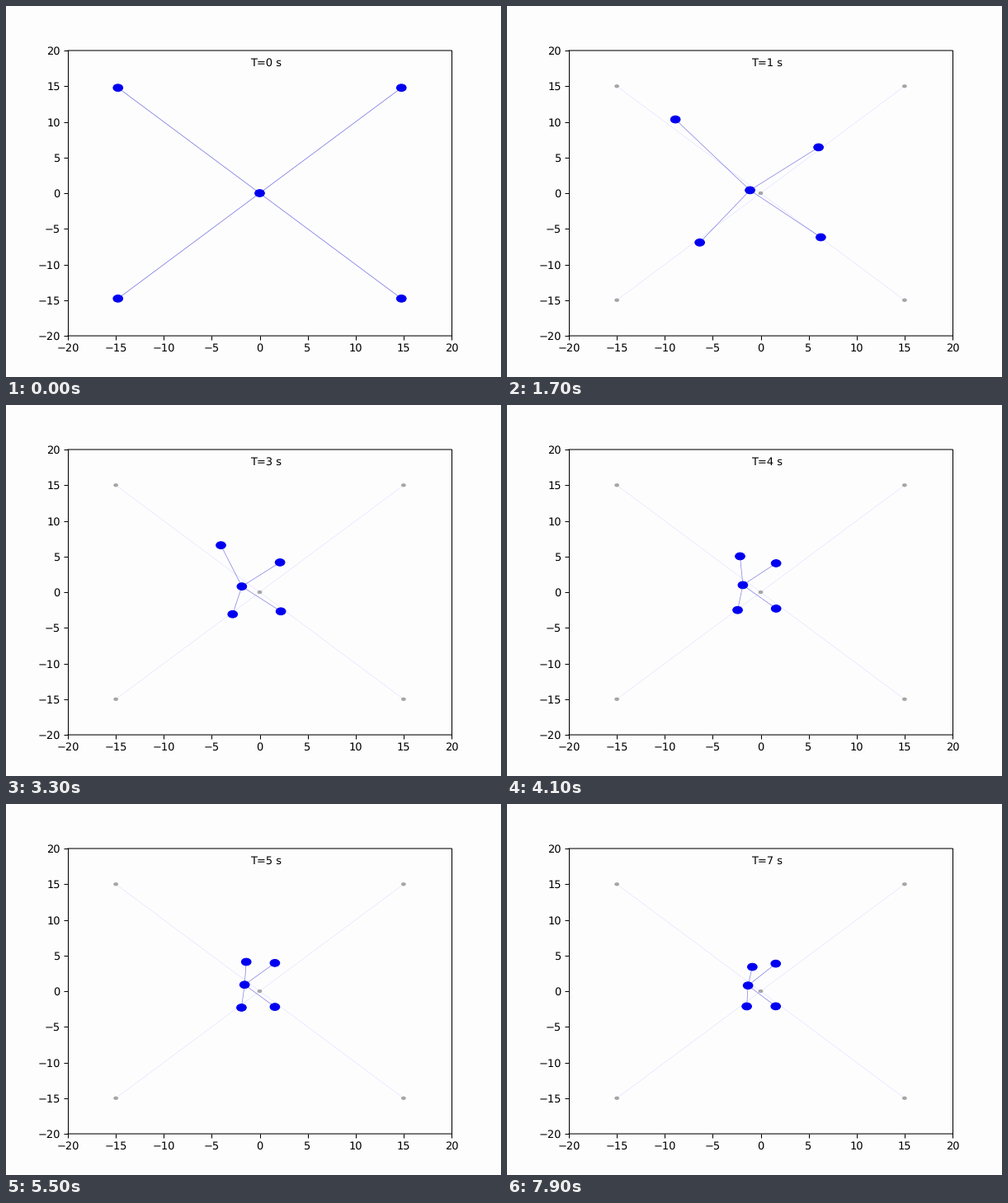
Write a matplotlib script that moves like this. It is 600 px wide and 450 px high and loops after 8000 ms.

```python
import matplotlib.pyplot as plt
import numpy as np
from matplotlib.animation import FuncAnimation
from matplotlib.patches import Circle

FPS = 10
FRAMES = 80
GATHER, END = 4.2, 8.0  # seconds at which the two phases finish
BACK = "#fefdfe"
BLUE = "#0000f0"
CORNERS = 15 * np.array([(-1, 1), (1, 1), (-1, -1), (1, -1)])

# Per agent: gathering point, final point, easing power along x and y
AGENTS = np.array([
    [(-2.0, 4.9), (-0.87, 3.40), (1.19, 1.15)],
    [(1.6, 4.05), (1.57, 3.86), (2.1, 2.9)],
    [(-2.4, -2.5), (-1.45, -2.13), (2.2, 1.97)],
    [(1.6, -2.3), (1.57, -2.12), (2.0, 2.25)],
])
HUB_GATHER = np.array([-1.86, 1.02])
HUB_FINAL = np.array([-1.32, 0.79])


def ease_out(t, start, stop, power):
    u = np.clip((t - start) / (stop - start), 0, 1)
    return 1 - (1 - u) ** power


def smoothstep(u):
    u = min(u, 1)
    return u * u * (3 - 2 * u)


def drift(t):
    return ease_out(t, GATHER, END, 1.8)


def agent_at(t, corner, gather, final, power):
    """Rush from the corner to the gathering point, then drift on."""
    start = 0.985 * corner
    return (start + (gather - start) * ease_out(t, 0, GATHER, power)
            + (final - gather) * drift(t))


def hub_at(t):
    rise = np.array([smoothstep(t / 3), min(t / GATHER, 1)])
    return HUB_GATHER * rise + (HUB_FINAL - HUB_GATHER) * drift(t)


plt.rcParams["text.hinting"] = "none"
fig, ax = plt.subplots(figsize=(6.4, 4.8), dpi=93.75, facecolor=BACK)
fig.subplots_adjust(bottom=0.111)
ax.set_facecolor(BACK)
ax.set(xlim=(-20, 20), ylim=(-20, 20),
       xticks=range(-20, 21, 5), yticks=range(-20, 21, 5))
ax.spines[["top", "bottom"]].set_snap(False)

# Starting layout
for x, y in CORNERS:
    ax.plot([0, x], [0, y], color="blue", lw=0.5, alpha=0.11, zorder=1)
for spot in [(0, 0), *CORNERS]:
    ax.add_patch(Circle(spot, 0.25, fc="#a6a6a6", lw=0, zorder=2))

links = [ax.plot([], [], color="#1010c8", lw=0.5, alpha=0.57, zorder=3)[0]
         for _ in AGENTS]
hub_dot, *dots = [
    ax.add_patch(Circle((0, 0), 0.5, fc=BLUE, ec=BLUE, lw=0.8, zorder=4))
    for _ in range(len(AGENTS) + 1)]
clock = ax.text(-1, 17.8, "")


def update(i):
    t = i / FPS
    hub = hub_at(t)
    hub_dot.center = hub
    for corner, agent, dot, link in zip(CORNERS, AGENTS, dots, links):
        spot = agent_at(t, corner, *agent)
        dot.center = spot
        link.set_data(*zip(hub, spot))
    clock.set_text(f"T={i // FPS} s")
    return [*links, hub_dot, *dots, clock]


anim = FuncAnimation(fig, update, frames=FRAMES, interval=1000 // FPS,
                     repeat=True, repeat_delay=0)
plt.show()
```
